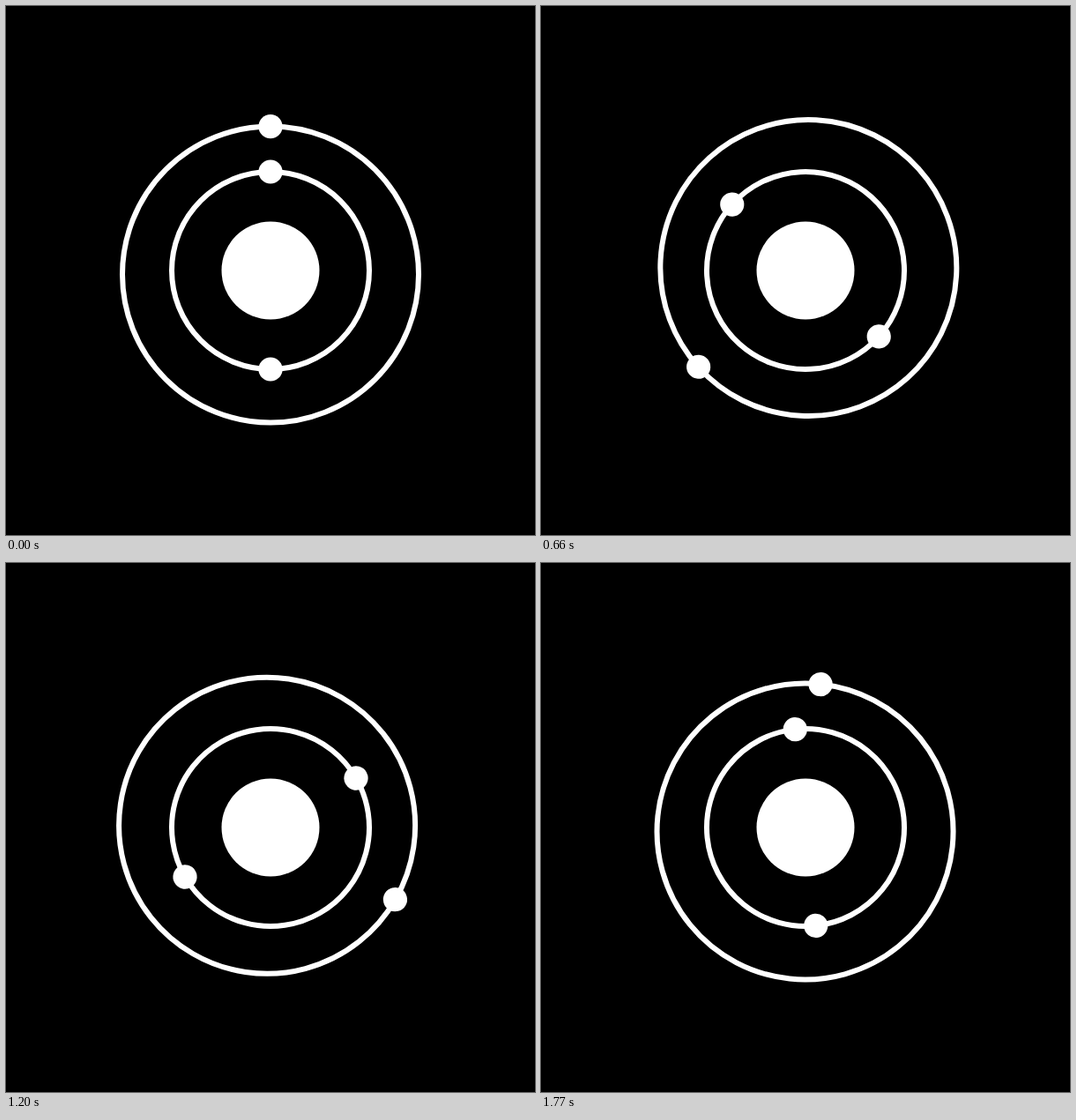
Animation of 600 by 600 pixels, one loop 1.8 s. Source, as an HTML page:

```html
<!DOCTYPE html>
<html lang="en">
<head>
<meta charset="utf-8">
<title>Atom</title>
<style>
  html, body { margin: 0; width: 100%; height: 100%; overflow: hidden; background: #000; }
  svg { display: block; width: 100%; height: 100%; }
  .ring { fill: none; stroke: #fff; stroke-width: 6; }
</style>
</head>
<body>
<svg viewBox="-300 -300 600 600" fill="#fff">
  <circle r="55.5"/>
  <g id="inner">
    <circle class="ring" r="112"/>
    <circle cy="-112" r="13.6"/>
    <circle cy="112" r="13.6"/>
  </g>
  <!-- the outer ring sits off centre, so it wobbles as it turns -->
  <g id="outer">
    <circle class="ring" cy="4.5" r="168"/>
    <circle cy="-163.3" r="13.6"/>
  </g>
</svg>
<script>
  const LOOP = 1800, STEP = 30;
  const inner = document.getElementById('inner');
  const outer = document.getElementById('outer');
  const start = performance.now();

  function draw() {
    const time = (performance.now() - start) % LOOP;
    const angle = Math.floor(time / STEP) * STEP / LOOP * 360;
    inner.setAttribute('transform', `rotate(${angle})`);
    outer.setAttribute('transform', `rotate(${-angle})`);
    requestAnimationFrame(draw);
  }
  draw();
</script>
</body>
</html>
```
